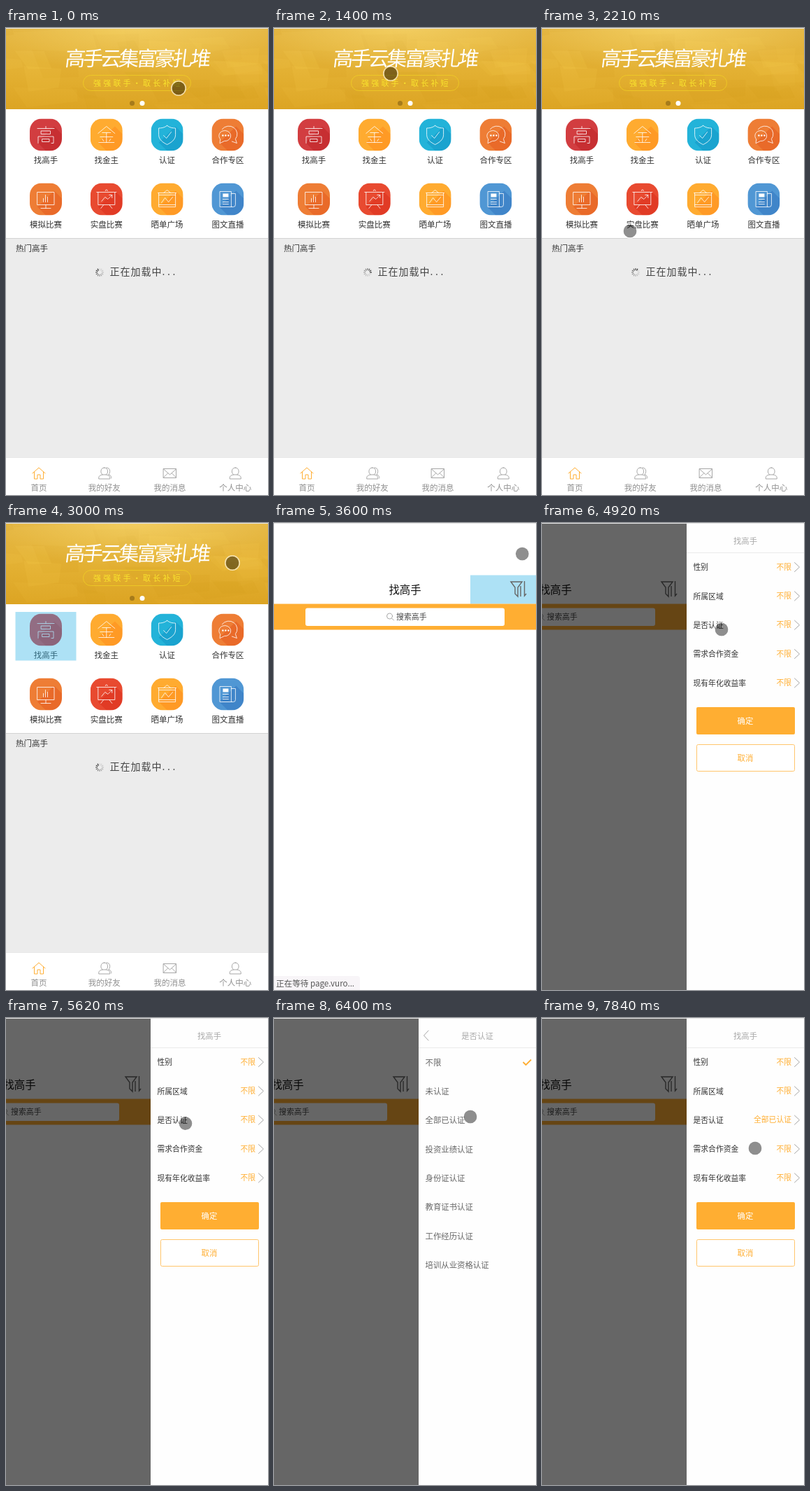
An HTML page that plays this animation: 375x667 px, repeating every 8 s.

```html
<!DOCTYPE html>
<html lang="zh-CN">
<head>
<meta charset="utf-8">
<title>找高手</title>
<style>
html, body { margin: 0; width: 100%; height: 100%; overflow: hidden; background: #fff; }
svg { display: block; }
text { font-family: "Noto Sans CJK SC", "Noto Sans CJK", "Open Sans", sans-serif; white-space: pre; }
.line { fill: none; stroke-width: 1; stroke-linejoin: round; stroke-linecap: round; }
.white { stroke: #fff; stroke-opacity: .8; }
.gray { stroke: #a6a6a6; }
.gold { stroke: #ffae32; }
.tap { fill: #33b5e5; fill-opacity: .4; }
.fold { mix-blend-mode: multiply; opacity: .3; }
</style>
</head>
<body>
<svg id="stage" width="375" height="667" viewBox="0 0 375 667">
  <defs>
    <linearGradient id="sun" x2="0" y2="1">
      <stop offset="0" stop-color="#e5b744"/>
      <stop offset=".55" stop-color="#e3b032"/>
      <stop offset="1" stop-color="#dca423"/>
    </linearGradient>
    <radialGradient id="glow" cx=".5" cy="0" r=".55">
      <stop offset="0" stop-color="#ffe27a" stop-opacity=".5"/>
      <stop offset="1" stop-color="#ffe27a" stop-opacity="0"/>
    </radialGradient>
    <clipPath id="tile"><rect x="-23" y="-23" width="46" height="46" rx="17"/></clipPath>
    <clipPath id="bannerBox"><rect width="375" height="116"/></clipPath>
  </defs>

  <g id="home">
    <rect width="375" height="667" fill="#fff"/>
    <g clip-path="url(#bannerBox)">
      <rect width="375" height="116" fill="url(#sun)"/>
      <g id="facets"></g>
      <rect width="375" height="116" fill="url(#glow)"/>
    </g>
    <rect x="110.500" y="67.500" width="154" height="22" rx="11" fill="none" stroke="#f0d024" stroke-opacity=".75"/>
    <circle cx="180.500" cy="107.500" r="3.500" fill="#a67b1b"/>
    <circle cx="195" cy="107.500" r="3.500" fill="#fff"/>
    <rect y="300" width="375" height="314" fill="#ececec"/>
    <rect y="300" width="375" height="1" fill="#d3d3d3"/>
    <rect y="613" width="375" height="1" fill="#e8e8e8"/>
    <g id="homeItems"></g>
    <g id="spinner"></g>
    <rect id="tileTap" class="tap" x="13.500" y="127" width="87" height="69.500"/>
  </g>

  <g id="drawer">
    <rect x="207" width="168" height="667" fill="#fefefe"/>
    <rect x="207" y="42" width="168" height="1" fill="#ebebeb"/>
    <g id="menu">
      <g id="rows"></g>
      <rect x="221" y="263" width="141" height="39" rx="2" fill="#ffae32"/>
      <rect x="221.500" y="316.500" width="140" height="38" rx="2" fill="#fff" stroke="#ffc56c"/>
    </g>
    <g id="options">
      <path class="line gray" d="M221 18L214.500 25L221 32"/>
      <path id="check" d="M356.500 63L360.500 67L368 59.500" fill="none" stroke="#ffae32" stroke-width="1.800"/>
    </g>
  </g>

  <g id="page">
    <rect width="375" height="667" fill="#fff"/>
    <rect id="filterTap" class="tap" x="281" y="74.500" width="94" height="41"/>
    <rect y="115.500" width="375" height="37" fill="#ffae32"/>
    <rect x="45" y="121.500" width="285" height="25.500" rx="3" fill="#fff"/>
    <g class="line gray"><circle cx="165.500" cy="133" r="4"/><path d="M168.500 136L171.500 139"/></g>
    <path d="M339 84H355L349 92V105L345 101V92ZM353 90V105M358.500 83V104L361 101" fill="none" stroke="#666" stroke-width="1.400"/>
    <rect id="shade" width="375" height="667" fill-opacity=".6"/>
  </g>
  <g id="ghost"></g>

  <g id="status">
    <path d="M0 647H119Q123 647 123 651V667H0Z" fill="#f8f5f8"/>
  </g>
  <rect width="375" height="1" fill="#e6e6e6"/>
  <g id="cursor">
    <circle r="9.500" fill-opacity=".44"/>
    <circle r="10.200" fill="none" stroke="#fff" stroke-opacity=".6" stroke-width="1.600"/>
  </g>
</svg>
<script>
const $ = id => document.getElementById(id);
const add = (id, markup) => $(id).insertAdjacentHTML('beforeend', markup);

// Text whose glyphs are vertically centred on cy.
const label = (x, cy, size, str, fill, extra = '') =>
  `<text x="${x}" y="${(cy + size * .38).toFixed(2)}" font-size="${size}" fill="${fill}" ${extra}>${str}</text>`;
const mid = 'text-anchor="middle"';
const end = 'text-anchor="end" font-weight="500"';
const line = (d, cls = 'white') => `<path class="line ${cls}" d="${d}"/>`;
const at = (x, y, inner) => `<g transform="translate(${x} ${y})">${inner}</g>`;

// Banner
let seed = 11;
const rand = () => (seed = seed * 16807 % 2147483647) / 2147483647;
for (let i = 0; i < 30; i++) {
  const x = rand() * 400 - 30, y = rand() * 125 - 15, w = 30 + rand() * 70, h = 10 + rand() * 26;
  const fill = i % 2 ? '#c48d14' : '#ffd45c';
  add('facets', `<path d="M${x} ${y}l${w} ${rand() * 12 - 6}l${rand() * 16 - 4} ${h}l${-w * .8} ${rand() * 10}z" fill="${fill}" opacity="${.04 + rand() * .07}"/>`);
}
add('homeItems',
  `<g transform="translate(187.500 43) skewX(-7)">${label(0, 0, 29, '高手云集富豪扎堆', '#fff', mid + ' font-weight="500" letter-spacing="-3.300"')}</g>` +
  label(125, 78.5, 11, '强强联手·取长补短', '#f9e32e', 'letter-spacing="3.200"'));

// Feature tiles
const dots = xs => xs.map(x => `<circle cx="${x}" cy="1" r="1.200" fill="#fff"/>`).join('');
const tiles = [
  ['找高手', '#d23d40', line('M0 -12V-9M-12 -9H12M-6.500 -5.500H6.500V-1H-6.500ZM-11 12V2.500H11V12H8M-5 6H5V10H-5Z')],
  ['找金主', '#ffab30', line('M-12 -2L0 -12L12 -2M-6 -3H6M-9 3H9M0 -3V11M-11 11H11M-6 6L-4 9M6 6L4 9')],
  ['认证', '#23b3d9', line('M0 -13C4 -10 8 -9.500 12 -9.500V0C12 7 6 11 0 14C-6 11 -12 7 -12 0V-9.500C-8 -9.500 -4 -10 0 -13ZM-5 1L-1 5L6 -4')],
  ['合作专区', '#ee7d35', line('M-8 -8A11 10.500 0 1 1 11 6L13 12L6 9.500M-11 6A8.500 7.500 0 1 1 -5 9L-11 12Z') + dots([-7, -3, 1])],
  ['模拟比赛', '#ee7d35', line('M-12 -10H12V8H-12ZM0 8V13M-7 13H7M-3.500 4V-1M-.5 4V-6M2.500 4V-3')],
  ['实盘比赛', '#e84a30', line('M-14 -10H14M-12 -10V8H12V-10M-4 8L-8 13M4 8L8 13M-7 3L-2 -3L2 0L8 -6M4 -6H8V-2M-1.500 -12A1.500 1.500 0 1 1 1.500 -12')],
  ['晒单广场', '#ffab30', line('M-13 -9H13M-12 -9V11H12V-9M-12 -6H12M-5 -9L0 -13L5 -9M-8 5L-3 -2L2 4L8 -3M-12 8H12')],
  ['图文直播', '#5097d4', line('M-11 -11H5V11H-11ZM5 -8H11V8Q11 11 8 11H5M-7 0H1M-7 4H1M-7 7H1') + '<rect x="-7" y="-8" width="8" height="5" fill="#fff"/>']
];
tiles.forEach(([name, color, art], i) => {
  const x = 57 + i % 4 * 86.8, y = i < 4 ? 152.5 : 244.5;
  add('homeItems', at(x, y,
    `<g clip-path="url(#tile)" fill="${color}"><rect x="-23" y="-23" width="46" height="46"/>
     <path class="fold" d="M12 -12L23 -1V23H0L-12 11Z"/></g>` + art) +
    label(x, y + 36.5, 11.5, name, '#333', mid));
});

// Loading line and tab bar
add('homeItems',
  label(14, 315, 11.5, '热门高手', '#333') +
  label(148.5, 348, 14, '正在加载中<tspan letter-spacing="3.600">...</tspan>', '#444', 'letter-spacing="1"'));
for (let i = 0; i < 12; i++)
  add('spinner', `<path d="M0 -3V-6" stroke="#222" stroke-width="1.100" opacity="${(.12 + .88 * (i / 11) ** 1.6).toFixed(2)}" transform="rotate(${i * 30})"/>`);
const person = 'M-2.500 2C-8 3 -8 5 -8 8H8C8 5 8 3 2.500 2M0 -8C-6 -8 -6 0 -2.500 2H2.500C6 0 6 -8 0 -8Z';
[
  ['首页', 'gold', 'M-9 0L0 -8L9 0M-6.500 -2V8H-2V2H2V8H6.500V-2'],
  ['我的好友', 'gray', person + 'M3 -8C9 -8 9 -1 6 2C10 3 10 5 10 7'],
  ['我的消息', 'gray', 'M-9 -6.500H9V6.500H-9ZM-9 -6L0 2L9 -6M-9 6L-3 0M9 6L3 0'],
  ['个人中心', 'gray', person]
].forEach(([name, cls, d], i) => {
  const x = 47 + i * 93.75;
  add('homeItems', at(x, 636, line(d, cls)) + label(x, 656.5, 11.5, name, '#909090', mid));
});

// Search page
add('status', label(3, 657.5, 11.6, '正在等待 page.vuro...', '#555'));
$('shade').insertAdjacentHTML('beforebegin',
  label(187.5, 95, 15.4, '找高手', '#111', mid + ' font-weight="500"') +
  label(175, 134, 10.9, '搜索高手', '#444'));
add('ghost', label(291, 26, 11.4, '找高手', '#000', mid + ' opacity=".35"'));

// Drawer
const rowY = i => 63 + i * 41.35;
add('menu', label(291, 26, 11.4, '找高手', '#aaa', mid) +
  label(291, 283, 11.4, '确定', '#fff', mid + ' font-weight="500"') +
  label(291, 335.5, 11.4, '取消', '#ffae32', mid));
['性别', '所属区域', '是否认证', '需求合作资金', '现有年化收益率'].forEach((name, i) => {
  const y = rowY(i);
  add('rows', label(216.5, y + .3, 10.8, name, '#333') +
    label(357, y - .5, 10.8, '不限', '#ffae32', end + (i === 2 ? ' id="certified"' : '')) +
    line(`M361.500 ${y - 6.5}L368.500 ${y}L361.500 ${y + 6.5}`, 'gray'));
});
add('options', label(291, 26, 11.4, '是否认证', '#aaa', mid));
['不限', '未认证', '全部已认证', '投资业绩认证', '身份证认证', '教育证书认证', '工作经历认证', '培训从业资格认证']
  .forEach((name, i) => add('options', label(216.5, rowY(i) + .3, 11.4, name, '#666')));

// The screen refreshes in bursts: [first, last, refreshes].
const bursts = [[0, 0, 1], [150, 1110, 8], [1260, 1400, 2], [1520, 2210, 7], [2330, 3000, 6], [3150, 3300, 2],
  [3450, 3720, 3], [4120, 4920, 7], [5380, 6400, 9], [6990, 7840, 7]];
function snap(t) {
  const [first, last, n] = bursts.filter(b => b[0] <= t).pop();
  if (t >= last) return last;
  const step = (last - first) / (n - 1);
  return first + Math.floor((t - first) / step) * step;
}

// Pointer stops: [time, x, y]
const stops = [[0, 247, 86], [150, 245, 85], [1110, 172, 65], [1400, 167, 65], [1850, 185, 430], [2210, 126, 290],
  [2500, 57, 165], [2640, 57, 165], [3000, 324, 57], [3300, 350, 94], [3720, 357, 28], [4120, 352, 34],
  [4700, 257, 152], [5380, 257, 152], [5700, 257, 148], [6400, 281, 141], [6990, 281, 141], [7250, 281, 143],
  [7840, 305, 186], [8000, 305, 186]];
function pointer(t) {
  const i = stops.findIndex(s => s[0] > t);
  const [t0, x0, y0] = stops[i - 1], [t1, x1, y1] = stops[i];
  const p = (t - t0) / (t1 - t0), e = p * p * (3 - 2 * p);
  return [x0 + (x1 - x0) * e, y0 + (y1 - y0) * e];
}

const show = (id, on) => $(id).setAttribute('display', on ? 'inline' : 'none');
const move = (id, x, y, turn = 0) => $(id).setAttribute('transform', `translate(${x} ${y}) rotate(${turn})`);

function draw(time) {
  const t = snap(time);
  const home = t < 3150, open = t >= 4120, picking = t >= 5760 && t < 7270;
  show('home', home);
  show('tileTap', t >= 2590);
  show('page', !home);
  show('filterTap', t >= 3300 && t < 4250);
  show('status', t >= 3450 && t < 4250);
  show('shade', open);
  show('ghost', open && t < 4250);
  show('drawer', open);
  show('rows', t >= 4250);
  show('menu', !picking);
  show('options', picking);
  move('check', 0, t >= 7120 ? 82.7 : 0);
  $('certified').textContent = t >= 7270 ? '全部已认证' : '不限';

  const p = Math.min(1, Math.max(0, (t - 4101) / 400));
  move('page', -Math.round(168 * (1 - (1 - p) ** 3)), 0);
  move('spinner', 134, 349, Math.floor(t % 1000 * .012) * 30);
  move('cursor', ...pointer(t));
}
const start = performance.now();
function loop() {
  draw((performance.now() - start) % 8000);
  requestAnimationFrame(loop);
}
loop();
</script>
</body>
</html>
```
